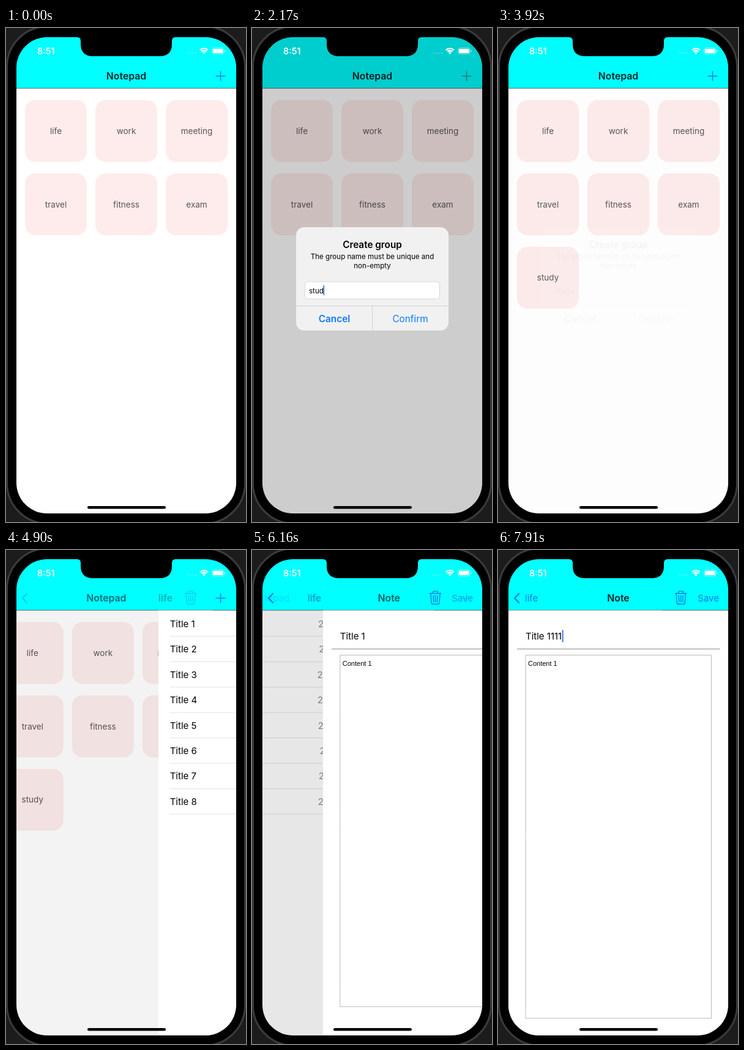
Write an HTML page with a canvas that moves like this. It is 392 px wide and 806 px high and loops after 8 s.

```html
<!DOCTYPE html>
<html lang="en">
<head>
<meta charset="utf-8">
<title>Notepad</title>
<style>
  html, body { margin: 0; width: 100%; height: 100%; overflow: hidden; background: #000; }
  canvas { display: block; width: 392px; height: 806px; }
</style>
</head>
<body>
<canvas id="stage"></canvas>
<script>
const W = 392, H = 806, LOOP = 8000, STEP = 70;
const LEFT = 17, TOP = 15, VIEW_W = 359, VIEW_H = 777, BAR_END = 98, MID = 196.5;
const SANS = 'Inter, Roboto, sans-serif', ARIAL = '"Liberation Sans", sans-serif';
const BLUE = '#0a7aff', TINT = '#0b7de6', INK = '#0d2428';

const groups = ['life', 'work', 'meeting', 'travel', 'fitness', 'exam', 'study'];
const times = ['50:55', '46:14', '46:29', '46:50', '47:03', '47:14', '47:27', '47:45'];
const keys = [1820, 1890, 2030, 2170, 2310];   // "study"
const ones = [7490, 7630, 7840];               // digits added to the title

const canvas = document.getElementById('stage');
const c = canvas.getContext('2d');
const dpr = window.devicePixelRatio || 1;
canvas.width = W * dpr;
canvas.height = H * dpr;

const ramp = (t, a, b) => Math.min(1, Math.max(0, (t - a) / (b - a)));
const typed = (t, list) => list.filter(k => t >= k).length;

// Critically damped spring from 0 to 1
function spring(t, start, rate) {
  const x = Math.max(0, t - start) / 1000 * rate;
  return 1 - (1 + x) * Math.exp(-x);
}

function layer(alpha, draw) {
  if (alpha <= 0) return;
  c.save();
  c.globalAlpha *= alpha;
  draw();
  c.restore();
}

function text(s, x, y, size, color, { weight = 400, align = 'left', font = SANS } = {}) {
  c.font = `${weight} ${size}px ${font}`;
  c.textAlign = align;
  c.fillStyle = color;
  c.fillText(s, x, y + size * .36);
}

function box(x, y, w, h, r, fill, stroke, width = 1) {
  c.beginPath();
  c.roundRect(x, y, w, h, r);
  if (fill) { c.fillStyle = fill; c.fill(); }
  if (stroke) { c.strokeStyle = stroke; c.lineWidth = width; c.stroke(); }
}

// Each line is a flat list of x, y pairs
function lines(color, width, ...paths) {
  c.strokeStyle = color;
  c.lineWidth = width;
  c.beginPath();
  for (const p of paths)
    for (let i = 0; i < p.length; i += 2)
      i ? c.lineTo(p[i], p[i + 1]) : c.moveTo(p[i], p[i + 1]);
  c.stroke();
}

function rect(x, y, w, h, color) {
  c.fillStyle = color;
  c.fillRect(x, y, w, h);
}

function device() {
  rect(0, 0, W, H, '#1c1c1c');
  box(1.5, -2.5, 389, 811, 66, '#000', '#3b3b3b', 3);
}

function notch() {
  c.fillStyle = '#000';
  c.beginPath();
  c.moveTo(116, 14);
  c.lineTo(116, 15);
  c.quadraticCurveTo(122, 15, 122, 21);
  c.lineTo(122, 26);
  c.quadraticCurveTo(122, 46, 142, 46);
  c.lineTo(251, 46);
  c.quadraticCurveTo(271, 46, 271, 26);
  c.lineTo(271, 21);
  c.quadraticCurveTo(271, 15, 277, 15);
  c.lineTo(277, 14);
  c.fill();
}

function status() {
  text('8:51', 51, 38, 14.3, '#f4ffff', { weight: 600 });
  for (let i = 0; i < 4; i++) box(296 + i * 4.2, 40, 2, 2, 1, 'rgba(255,255,255,.4)');
  c.strokeStyle = c.fillStyle = '#fff';
  c.lineWidth = 2.3;
  for (const r of [5.6, 9.2]) {
    c.beginPath();
    c.arc(323.3, 42.6, r, -Math.PI * .75, -Math.PI * .25);
    c.stroke();
  }
  c.beginPath();
  c.moveTo(323.3, 43);
  c.arc(323.3, 42.6, 3.2, -Math.PI * .75, -Math.PI * .25);
  c.fill();
  box(336.5, 32.5, 19.6, 10, 3, null, 'rgba(255,255,255,.5)');
  box(338, 34, 16.6, 7, 1.6, '#fff');
  box(357.2, 36, 1.3, 3.4, .6, 'rgba(255,255,255,.6)');
}

const plus = color => lines(color, 1.5, [342.5, 78.5, 358.5, 78.5], [350.5, 70.5, 350.5, 86.5]);
const chevron = () => lines(TINT, 2.2, [34.8, 70.5, 27, 78.5, 34.8, 86.5]);

function trash(x) {
  lines(TINT, 1.4,
    [x - 9.5, 70.8, x + 9.5, 70.8],
    [x - 4, 70.5, x - 3.6, 67.4, x + 3.6, 67.4, x + 4, 70.5],
    [x - 7.6, 71, x - 6.4, 87, x - 5, 88.3, x + 5, 88.3, x + 6.4, 87, x + 7.6, 71],
    [x - 3.4, 74, x - 2.9, 85], [x, 74, x, 85], [x + 3.4, 74, x + 2.9, 85]);
}

const heading = (s, x) => text(s, x, 78.5, 15.8, INK, { weight: 600, align: 'center' });
const label = (s, x) => text(s, x, 78.5, 15, TINT);

// A title slides left and turns into the back label
function titleToLabel(s, half, p) {
  const x = MID - half + (44 - MID + half) * p ** 1.25;
  layer(1 - p, () => heading(s, x + half));
  layer(p * p, () => label(s, x));
}

function navBar(p1, p2, dim) {
  rect(LEFT, TOP, VIEW_W, BAR_END - TOP, '#0ff');
  rect(LEFT, BAR_END - .5, VIEW_W, 1, 'rgba(110,150,150,.6)');
  layer(p1, chevron);
  if (p2 > 0) {
    layer(1 - p2, () => label('Notepad', 44 - 60 * p2));
    titleToLabel('life', 11.5, p2);
    layer(p2, () => heading('Note', MID + 99 * (1 - p2)));
  } else {
    titleToLabel('Notepad', 33, p1);
    layer(p1, () => heading('life', MID + 99 * (1 - p1)));
  }
  layer(p1, () => trash(301.5 - 2.8 * p2));
  layer((1 - dim) * (1 - p2), () => plus(TINT));
  layer(dim, () => plus('#3c8f92'));
  layer(p2, () => text('Save', 361, 78.5, 15, TINT, { align: 'right' }));
}

function home(t) {
  groups.slice(0, t >= 3700 ? 7 : 6).forEach((name, i) => {
    const x = 31 + i % 3 * 115, y = 117.5 + Math.floor(i / 3) * 119.7;
    box(x, y, 101, 101, 17, '#fdeceb');
    text(name, x + 50.5, y + 50.5, 13.5, '#595554', { align: 'center' });
  });
}

function list() {
  times.forEach((time, i) => {
    const y = 120.3 + i * 41.45;
    text('Title ' + (i + 1), 36, y, 15, '#000');
    text('2022-02-20 20:' + time, 341, y, 15, '#8a8a8e', { align: 'right' });
    lines('#c2c2c5', 1.7, [351, y - 5.5, 356.5, y - .5, 351, y + 4.5]);
    rect(36, y + 20, 340, 1, '#e2e2e4');
  });
}

function note(t) {
  const title = 'Title 1' + '1'.repeat(typed(t, ones));
  text(title, 45, 141, 15, '#000');
  if (t >= 7280) rect(45.5 + c.measureText(title).width, 130.5, 2, 20, '#3d7bd6');
  rect(31, 161, 331.5, 1, '#8e8e8e');
  const grow = 1 - (1 - ramp(t, 7210, 7560)) ** 2;
  box(45, 171.5, 303.5, 573.5 + 19 * grow, 0, null, '#b9b9b9');
  text('Content 1', 49, 185.5, 11, '#000', { font: ARIAL });
}

function page(x, shade, draw) {
  c.save();
  c.translate(x, 0);
  c.beginPath();
  c.rect(LEFT, BAR_END + .5, VIEW_W, H);
  c.clip();
  rect(LEFT, BAR_END, VIEW_W, H, '#fff');
  draw();
  if (shade) rect(LEFT, BAR_END, VIEW_W, H, `rgba(0,0,0,${shade})`);
  c.restore();
}

// The next page slides over the current one, which drifts left and darkens
function push(p, from, to) {
  if (p < 1) page(-.3 * VIEW_W * p, .13 * p, from);
  if (p > 0) page(VIEW_W * (1 - p), 0, to);
}

function caretAlpha(t) {
  if (t >= 3640) return 0;
  if (t >= 2800) return 1 - ramp(t, 2730, 3010) + ramp(t, 3150, 3360);
  if (t >= 1820) return 1;
  return 1 - ramp(t, 980, 1260) + ramp(t, 1400, 1610);
}

function alertBox(t, scale) {
  c.translate(MID, 409.3);
  c.scale(scale, scale);
  c.translate(-MID, -409.3);
  box(72, 325, 249, 168.5, 13, 'rgba(243,243,243,.97)');
  const mid = { align: 'center' };
  text('Create group', MID, 353, 15.3, '#000', { weight: 600, align: 'center' });
  text('The group name must be unique and', MID, 373, 11.6, '#000', mid);
  text('non-empty', MID, 387.5, 11.6, '#000', mid);
  box(86.5, 414, 220, 28, 5, '#fff', '#cfcfcf', .8);
  const word = 'study'.slice(0, typed(t, keys));
  text(word || 'Input group name', 93, 428.5, 11.6, word ? '#000' : '#c3c3c6');
  const caretX = 92.5 + c.measureText(word).width;
  layer(caretAlpha(t), () => rect(caretX, 420, 1.8, 16, '#3d7bd6'));
  if (t >= 3500 && t < 3640) {
    c.beginPath();
    c.roundRect(197, 454, 124, 39.5, [0, 0, 13, 0]);
    c.fillStyle = '#dcdcdc';
    c.fill();
  }
  rect(72, 453, 249, .8, '#cbcbcd');
  rect(196, 453, .8, 40.5, '#cbcbcd');
  text('Cancel', 134.5, 474, 15.3, BLUE, { weight: 600, align: 'center' });
  text('Confirm', 258.5, 474, 15.3, BLUE, mid);
}

function draw(t) {
  const shown = spring(t, 740, 14);
  const gone = 1 - (1 - ramp(t, 3640, 3990)) ** 2;
  const dim = shown * (1 - gone);
  const p1 = spring(t, 4822, 16), p2 = spring(t, 6000, 16);

  c.setTransform(dpr, 0, 0, dpr, 0, 0);
  device();
  c.save();
  c.beginPath();
  c.roundRect(LEFT, TOP, VIEW_W, VIEW_H, 50);
  c.clip();
  if (p2 > 0) push(p2, list, () => note(t));
  else push(p1, () => home(t), list);
  navBar(p1, p2, dim);
  if (dim > 0) {
    rect(LEFT, TOP, VIEW_W, VIEW_H, `rgba(0,0,0,${.195 * dim})`);
    layer(dim, () => alertBox(t, 1.2 - .2 * shown));
  }
  status();
  box(133, 780, 128, 4.6, 2.3, '#000');
  c.restore();
  notch();
}

function tick(now) {
  draw(Math.floor(now % LOOP / STEP) * STEP);
  requestAnimationFrame(tick);
}
requestAnimationFrame(tick);
</script>
</body>
</html>
```
